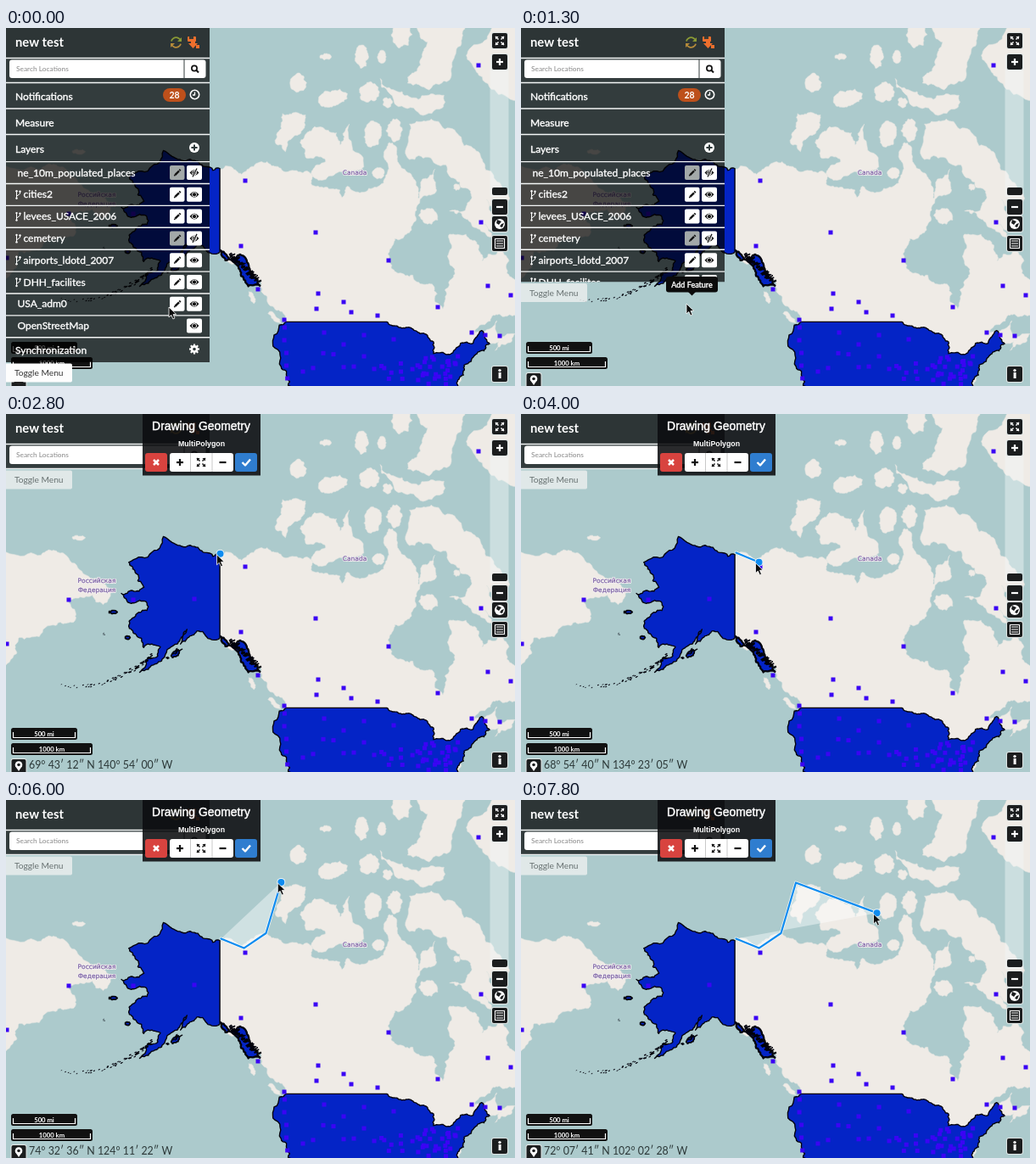
Recreate the animation shown at these times as an HTML page with a canvas. Size 600x422 px, loop 8 s.

```html
<!DOCTYPE html>
<html lang="en">
<head>
<meta charset="utf-8">
<title>Map drawing tool</title>
<style>
html, body { margin: 0; width: 100%; height: 100%; overflow: hidden; background: #accacc; }
canvas { display: block; }
</style>
</head>
<body>
<canvas id="stage" width="600" height="422"></canvas>
<script>
const W = 600, H = 422, LOOP = 8000, TAU = Math.PI * 2;
const BLUE = '#0424c6', DOT = '#3a04f4', DRAW = '#0f8cf0', LATO = 'Lato, sans-serif';
const ARIAL = '"Liberation Sans", Arial, sans-serif';
const stage = document.getElementById('stage').getContext('2d');
let g = stage;

// ---- Mercator projection; longitudes are degrees west ----
const mercator = lat => Math.log(Math.tan(Math.PI / 4 + lat * Math.PI / 360));
const project = (lon, lat) => [280.5 + (134.385 - lon) * 4.297, 174.6 - 246.2 * (mercator(lat) - 1.6816)];
const pairs = list => list.reduce((out, v, i) => (i % 2 ? out.push([list[i - 1], v]) : 0, out), []);

let seed = 7;
function random() {
  seed = (seed + 0x6D2B79F5) | 0;
  let v = Math.imul(seed ^ (seed >>> 15), 1 | seed);
  v = (v + Math.imul(v ^ (v >>> 7), 61 | v)) ^ v;
  return ((v ^ (v >>> 14)) >>> 0) / 4294967296;
}

// ---- Drawing helpers ----
function box(x, y, w, h, color, r = 0) {
  g.fillStyle = color;
  g.beginPath();
  g.roundRect(x, y, w, h, r);
  g.fill();
}
function disc(x, y, r, color) {
  g.fillStyle = color;
  g.beginPath();
  g.arc(x, y, r, 0, TAU);
  g.fill();
}
function ring(x, y, r, color, width = 1.4, from = 0, to = TAU) {
  g.strokeStyle = color;
  g.lineWidth = width;
  g.beginPath();
  g.arc(x, y, r, from, to);
  g.stroke();
}
function trace(points) {
  g.beginPath();
  points.forEach(([x, y], i) => i ? g.lineTo(x, y) : g.moveTo(x, y));
}
function line(color, width, ...coords) {
  trace(pairs(coords));
  g.strokeStyle = color;
  g.lineWidth = width;
  g.stroke();
}
function shape(points, fill, stroke, width = 1) {
  trace(points);
  g.closePath();
  if (fill) { g.fillStyle = fill; g.fill(); }
  if (stroke) { g.strokeStyle = stroke; g.lineWidth = width; g.stroke(); }
}
function text(str, x, y, font, color, align = 'left', weight = 0) {
  g.font = font;
  g.textAlign = align;
  g.textBaseline = 'alphabetic';
  g.fillStyle = g.strokeStyle = color;
  g.lineWidth = weight;
  if (weight) g.strokeText(str, x, y);
  g.fillText(str, x, y);
}

// ---- Coastlines: few points, roughened by midpoint displacement ----
function split(a, b, depth) {
  const dx = b[0] - a[0], dy = b[1] - a[1], len = Math.hypot(dx, dy);
  if (!depth || len > 75 || len < 2.5) return [a];
  const k = (random() - 0.5) * 0.42;
  const m = [(a[0] + b[0]) / 2 - dy * k, (a[1] + b[1]) / 2 + dx * k];
  return [...split(a, m, depth - 1), ...split(m, b, depth - 1)];
}
const roughen = pts => pts.flatMap((p, i) => split(p, pts[(i + 1) % pts.length], 4));
const coast = list => roughen(pairs(list).map(p => project(...p)));

function island(lon, lat, rx, ry, tilt = 0) {
  const [x, y] = project(lon, lat), c = Math.cos(tilt), s = Math.sin(tilt);
  return roughen(Array.from({ length: 7 }, (_, i) => {
    const u = rx * Math.cos(i * TAU / 7), v = ry * Math.sin(i * TAU / 7);
    return [x + u * c - v * s, y + u * s + v * c];
  }));
}

const MAINLAND = [141,69.6, 135,69.1, 128,70.3, 124,69.5, 115,69, 116,68.2, 108,67.5, 107.5,66.7, 106,67.9, 98,67.8,
  95.5,69, 96,71, 94.5,72, 92,70.2, 88,68.8, 86.5,66.6, 85.5,68.6, 82,69.6, 81.5,67.5, 87,65.3, 88,63.7, 93,61.8,
  94.7,58.9, 92,57, 85,55.3, 82.3,55, 82,52.5, 79.8,51.3, 79.2,54.5, 76.5,57, 78.2,59, 78,62.4, 73.5,62.4, 70,61,
  69,58.8, 65,59.8, 64.6,60.4, 61.5,56.5, 57,53.5, 58,51.4, 60,50.2, 66,50.2, 71,47, 65,49.2, 65,47, 64,46,
  60,46.8, 61.2,45.2, 65.5,43.6, 64.5,45.3, 67,44.9, 75,40.5, 77,35, 121,35, 124.2,42, 124.4,48.2, 122.7,49,
  128,52.5, 130,56, 136,58.5, 141,60];
const CHUKOTKA = [205,70, 190,69.6, 184,69.8, 175,67.3, 169.8,66.1, 173,64.3, 176,65.4, 182.5,64.6, 180.5,62.6,
  186,61.7, 196,60.1, 196.8,57.8, 205,53];
const VICTORIA = [105,69.2, 113,68.5, 116,69.2, 112,70.3, 117.5,70.7, 119,72, 115,73.3, 109,72.8, 108,71.8, 105.5,73.5,
  101.5,69.8];
const BANKS = [123,71.2, 125.8,72, 123.8,74.3, 117.5,74.2, 119,72.7];
const BAFFIN = [89,73.5, 81,73.7, 74,71.7, 68,69.5, 61.5,66.6, 64,65.2, 67.8,66.5, 65,64.2, 64.8,62.6, 68.5,63.7,
  66,61.9, 73,64.2, 78,65.2, 74,65.2, 72.5,67.5, 79,70, 89,70.5];
const DEVON = [92,74.8, 80,74.7, 79.5,75.6, 89,75.5, 97,76.7];
const ELLESMERE = [89.5,76.4, 78,76.6, 75,78.6, 73,80, 88,80, 84,78.8, 86,77.5];
const GREENLAND = [55,81, 65,80, 73,78.3, 69,76.8, 58,75.5, 57,74, 50,73];
const ALASKA = [141,69.65, 148,70.4, 156.5,71.3, 166,68.9, 163.5,67, 161.8,66.3, 168,65.6, 166.3,64.6, 161,64.5,
  161,63.6, 164.8,62.7, 166,61.6, 162.5,60, 161.9,58.7, 157.3,58.8, 158,57.5, 163,55, 158.5,56.3, 154,58.9,
  150,61.2, 151.8,59.2, 147,61, 145,60.4, 141,60];
const PANHANDLE = [141,60.3, 136.5,58.3, 133.2,55, 130,55.1, 132,56.8, 135.5,59.7, 137.5,59];
const STATES = [124.7,48.4, 122.8,49, 95.2,49, 89.5,48, 84.8,46.8, 82.4,45.3, 82.4,43, 79,42.8, 76.8,43.6, 75,45, 71.5,45,
  69.2,47.4, 67.8,45.7, 67,44.9, 70.8,42.8, 74,40.6, 76,36.9, 75.5,35, 121,35, 124.2,40.3];

// Longitude, latitude, half width, half height, tilt
const ISLANDS = [[97.5,69.2,7,7], [99,72.7,10,16], [93,73,9,14], [110,75.4,18,10,-0.3], [119.5,76.4,10,11],
  [100,75.8,12,12], [95,75.1,6,6], [102,78,8,14], [96.5,78,5,8], [112,78,7,4], [91,79.2,12,16],
  [83.8,64.6,12,9,0.4], [126,49.8,10,3,0.7], [132.2,53.2,3,8,-0.4], [76,67.8,4,4], [179.7,71.2,8,3]];
const BLUE_ISLANDS = [[153.2,57.8,6,3,-0.7], [170.3,63.4,5,2], [166.3,60.1,3,2]];
const CITIES = [557,44, 282,180, 365,241, 451,274, 560,229, 277,257, 297,308, 368,313, 366,331, 398,323, 407,335,
  438,339, 509,329, 568,304, 595,315, 74,219, 1,271, 222,218, 150,219, 328,344, 375,359, 398,373, 422,362, 457,367,
  549,359, 565,362, 582,363];

function speckles(count, at) {
  for (let i = 0; i < count; i++) {
    const [x, y, r] = at(random());
    g.save();
    g.translate(x + (random() - 0.5) * r * 3, y + (random() - 0.5) * r * 3);
    g.rotate(-0.5);
    box(-r, -r / 2, r * 2, r * (0.6 + random() * 0.5), '#02020c', 0.6);
    g.restore();
  }
}

function paintMap() {
  const land = pts => shape(pts, '#efebe6', '#e0e3df', 0.6);
  const ink = '#05050f', city = (x, y) => box(x - 2.5, y - 2.5, 5, 5, DOT);
  box(0, 0, W, H, '#accacc');
  [MAINLAND, CHUKOTKA, VICTORIA, BANKS, BAFFIN, DEVON, ELLESMERE, GREENLAND].forEach(c => land(coast(c)));
  ISLANDS.forEach(i => land(island(...i)));
  shape(coast(STATES), BLUE, ink, 1.4);
  shape(coast(PANHANDLE), BLUE, ink, 2.4);
  shape(coast(ALASKA), BLUE, ink, 1.4);
  BLUE_ISLANDS.forEach(i => shape(island(...i), BLUE, ink, 1.8));
  speckles(75, t => [264 + 33 * t, 266 + 32 * t, 2]);
  speckles(65, v => {
    const t = Math.sqrt(v), u = 1 - t;
    return [u * u * 55 + 2 * u * t * 117 + t * t * 176, u * u * 318 + 2 * u * t * 333 + t * t * 282, 0.8 + t * 0.8];
  });
  speckles(14, t => [190 + 16 * t, 289 - 13 * t, 1.5]);
  speckles(3, t => [114 + 3 * t, 258 + 2 * t, 0.8]);
  pairs(CITIES).forEach(p => city(...p));
  for (let i = 0; i < 5; i++) city(328 + random() * 5, 353 + i * 15);
  for (let i = 0; i < 8; i++) city(350 + i * 12, 380 + random() * 26);
  for (let i = 0; i < 40; i++) {
    const x = 440 + 100 * Math.sqrt(random()), y = 387 + random() * 34;
    if (x < 536 - (y - 385) * 0.4) city(x, y);
  }
  const label = (str, x, y) => {
    text(str, x, y, '7.5px "DejaVu Sans", sans-serif', '#f3eff0', 'center', 2);
    text(str, x, y, '7.5px "DejaVu Sans", sans-serif', '#7a60a4', 'center', 0.2);
  };
  label('Canada', 411, 173);
  label('Российская', 107, 199);
  label('Федерация', 107, 210);
}

// ---- Icons, centred on x, y ----
const minus = (x, y, c, r = 4, w = 2.2) => line(c, w, x - r, y, x + r, y);
const plus = (x, y, c, r = 4, w = 2.2) => { minus(x, y, c, r, w); line(c, w, x, y - r, x, y + r); };
function expand(x, y, c, r = 5) {
  for (const sx of [-1, 1]) for (const sy of [-1, 1]) {
    line(c, 1.5, x + sx * 1.5, y + sy * 1.5, x + sx * r, y + sy * r);
    shape([[x + sx * r, y + sy * r], [x + sx * (r - 3.6), y + sy * r], [x + sx * r, y + sy * (r - 3.6)]], c);
  }
}
function pencil(x, y) {
  line('#111', 2.4, x - 2.6, y + 2.6, x + 2, y - 2);
  line('#111', 2.4, x + 2.5, y - 2.5, x + 3.6, y - 3.6);
  disc(x - 3.2, y + 3.2, 0.9, '#111');
}
function eye(x, y, hidden) {
  g.fillStyle = '#111';
  g.beginPath();
  g.moveTo(x - 5.5, y);
  g.quadraticCurveTo(x, y - 7, x + 5.5, y);
  g.quadraticCurveTo(x, y + 7, x - 5.5, y);
  g.fill();
  ring(x, y, 2.6, '#fff', 0.9);
  if (hidden) {
    line('#fff', 2.6, x - 2, y + 5, x + 3, y - 5);
    line('#111', 1.3, x - 2, y + 5, x + 3, y - 5);
  }
}
function fork(x, y) {
  line('#fff', 1, x - 2, y - 4, x - 2, y + 5);
  line('#fff', 1, x - 2, y + 2, x + 2, y - 1, x + 2, y - 3);
  disc(x - 2, y - 4, 1.2, '#fff');
  disc(x + 2, y - 3.5, 1.2, '#fff');
  disc(x - 2, y + 4.5, 1.2, '#fff');
}
function gear(x, y) {
  for (let i = 0; i < 4; i++) {
    const a = i * Math.PI / 4, c = Math.cos(a) * 6, s = Math.sin(a) * 6;
    line('#fff', 2.2, x - c, y - s, x + c, y + s);
  }
  disc(x, y, 4.4, '#fff');
  disc(x, y, 1.8, '#313b3c');
}

// ---- Map controls ----
function paintControls() {
  box(570.5, 31, 22, 168, 'rgba(240,246,246,.45)', 2);
  const tile = (y, h = 18) => {
    box(572, y - 1, 20, h + 2, '#dfe5e4', 3);
    box(573, y, 18, h, '#1b1d1e', 2);
  };
  [6, 31, 202, 222, 245, 399].forEach(y => tile(y));
  box(573, 188, 18, 9, '#1b1d1e', 2);
  expand(582, 15, '#fff');
  plus(582, 40, '#fff');
  minus(582, 211, '#fff');
  disc(582, 231, 6, '#fff');
  shape([[579, 226], [584, 228], [581, 232], [578, 230]], '#1b1d1e');
  shape([[584, 231], [587, 230], [585, 235], [582, 234]], '#1b1d1e');
  g.strokeStyle = '#fff'; g.lineWidth = 1.1; g.strokeRect(576.5, 248.5, 11, 11);
  for (let y = 251; y < 258; y += 3) line('#fff', 1, 578, y, 586, y);
  box(580.6, 406, 3, 7, '#fff');
  disc(582, 403.6, 1.7, '#fff');

  const scale = (y, w, str) => {
    box(6, y, w, 14, '#111', 2.5);
    line('#fff', 1.2, 8.5, y + 5, 8.5, y + 11.5, w + 3.5, y + 11.5, w + 3.5, y + 5);
    text(str, 6 + w / 2, y + 9.6, 'bold 7.7px ' + LATO, '#fff', 'center');
  };
  scale(370, 78, '500 mi');
  scale(388, 96, '1000 km');
  box(5.5, 406, 19, 20, '#e5e9e8', 3);
  box(6.5, 407, 17, 19, '#1b1d1e', 2);
  disc(15, 413.5, 4.3, '#fff');
  shape([[11, 415], [19, 415], [15, 421]], '#fff');
  disc(15, 413.5, 1.8, '#1b1d1e');
}

// ---- Side menu ----
const LAYERS = ['ne_10m_populated_places', 'cities2', 'levees_USACE_2006', 'cemetery',
  'airports_ldotd_2007', 'DHH_facilites', 'USA_adm0', 'OpenStreetMap'];

function paintMenu(height, hover) {
  g.save();
  g.beginPath(); g.rect(0, 0, 240, height); g.clip();
  box(0, 0, 240, height, 'rgba(0,0,0,.7)');
  box(0, 0, 240, 35, 'rgba(0,0,0,.12)');
  const rule = y => line('#f4f6f6', 1.4, 0, y, 240, y);
  [35.5, 64.5, 95, 125.5].forEach(rule);
  for (let i = 0; i < 9; i++) rule(157.6 + i * 25.9);
  text('new test', 11, 22, 'bold 14.8px ' + LATO, '#fff');
  ring(200.5, 17, 5.8, '#8a9a35', 1.8, 3.4, 6);
  ring(200.5, 17, 5.8, '#b58a3a', 1.8, 0.3, 2.8);
  shape([[207, 11], [207, 16], [202, 16]], '#8a9a35');
  shape([[194, 23], [194, 18], [199, 18]], '#b58a3a');
  box(214, 10, 10, 6, '#ee6f2d', 1);
  box(216, 10, 5, 3, '#3b3a34');
  box(218, 14, 5, 5, '#ee6f2d');
  shape([[215, 18], [226, 18], [220.5, 24]], '#ee6f2d');
  box(224, 20, 4, 4, '#ee6f2d');

  box(4, 37.5, 205.5, 21.5, '#fff', [3, 0, 0, 3]);
  box(210.5, 37.5, 25, 21.5, '#fff', [0, 3, 3, 0]);
  text('Search Locations', 12, 51, '8.4px ' + LATO, '#888');
  ring(222, 47.5, 3.1, '#111', 1.7);
  line('#111', 2, 224.3, 49.8, 227, 52.5);

  const heading = (str, y) => text(str, 11, y, '12px ' + LATO, '#fff', 'left', 0.4);
  heading('Notifications', 85);
  heading('Measure', 116);
  heading('Layers', 147);
  heading('Synchronization', 384);
  box(185, 71, 27, 16, '#bd501b', 8);
  text('28', 198.5, 82.5, 'bold 10.5px ' + LATO, '#fff', 'center');
  ring(222.5, 78.5, 5.2, '#fff', 1.6);
  line('#fff', 1.3, 222.5, 75.5, 222.5, 79, 220, 79);
  disc(222, 141, 6, '#fff');
  plus(222, 141, '#303b3c', 3.6, 2);
  gear(222, 378.5);

  LAYERS.forEach((name, i) => {
    const y = 170.5 + i * 25.8, off = i === 0 || i === 3, branch = i > 0 && i < 6;
    if (branch) fork(14.5, y);
    text(name, branch ? 20.5 : 13.5, y + 4, '12px ' + LATO, '#fff', 'left', 0.35);
    if (i < 7) {
      box(193, y - 8.5, 17.5, 17, off ? '#a3a9a9' : hover && i === 6 ? '#dfe2e2' : '#fff', 2);
      pencil(202, y);
    }
    box(213, y - 8.5, 18, 17, '#fff', 2);
    eye(222, y, off);
  });
  g.restore();

  const open = height > 390;
  box(0, height + 1.5, 78, 22, open ? '#fdfdfd' : 'rgba(232,237,237,.87)', [0, 2, 2, 0]);
  if (open) shape([[9, 417], [21, 417], [15, 422]], '#222');
  text('Toggle Menu', 10, height + 16, '10.2px ' + LATO, open ? '#333' : '#667070');
}

function paintTooltip(alpha) {
  g.globalAlpha = alpha;
  box(171, 293, 61, 18.5, '#0b0b0b', 3);
  shape([[197, 311], [206, 311], [201.5, 315.5]], '#0b0b0b');
  text('Add Feature', 201.5, 305.8, '9px ' + LATO, '#fff', 'center', 0.4);
  g.globalAlpha = 1;
}

function paintToolbox(height) {
  box(161, 0, 139, height, 'rgba(12,13,15,.88)');
  text('Drawing Geometry', 230, 19, '13.9px ' + ARIAL, '#fff', 'center', 0.45);
  text('MultiPolygon', 230.5, 38, 'bold 8.8px ' + ARIAL, '#fff', 'center');
  box(164, 46, 26, 22, '#d8433f', 3);
  box(193, 46, 75, 22, '#fff', 3);
  box(270, 46, 26, 22, '#2f7dcf', 3);
  line('#c9c9c9', 1, 217.5, 46, 217.5, 68);
  line('#c9c9c9', 1, 243, 46, 243, 68);
  line('#fff', 2.5, 174, 54, 180, 60);
  line('#fff', 2.5, 180, 54, 174, 60);
  plus(205, 57, '#111');
  expand(230, 57, '#111');
  minus(255.5, 57, '#111');
  line('#fff', 2.4, 278.5, 57, 282, 60.5, 288, 53.5);
}

function paintCursor(x, y) {
  const outline = [[0, 0], [0, 12], [2.8, 9.4], [4.9, 14], [7, 13], [5, 8.6], [8.6, 8.3]];
  shape(outline.map(([dx, dy]) => [x + dx, y + dy]), '#0a0a0a', '#fff', 0.8);
}

// ---- Timeline ----
// Menu phase: time, cursor x, cursor y, menu height, tooltip opacity
const MENU_STEPS = [[0, 192, 329, 394, 0], [300, 196, 327, 394, 0.6], [500, 197, 325, 394, 1],
  [1000, 195, 325, 394, 1], [1300, 195, 325, 299.5, 1], [1500, 197, 319, 65, 0.9]];
// Drawing phase: time, longitude west, latitude, corners already placed
const DRAW_STEPS = [[1800, 150.5567, 57.7042, 0], [2000, 150.2, 58.2, 0], [2300, 145.2, 64.9, 0],
  [2500, 140.9, 69.72, 0], [3000, 140.85, 69.67, 1], [3300, 137.2, 69.25, 1], [3500, 134.6, 68.93, 1],
  [4000, 134.3847, 68.9111, 1], [4300, 134.3847, 68.9111, 2], [4500, 133.1, 69.15, 2], [4800, 129.8, 69.9, 2],
  [5000, 128.3, 70.4, 2], [5300, 125.5958, 73.0225, 3], [5500, 124.1894, 74.5433, 3], [6300, 124.1894, 74.5433, 4],
  [6500, 123.6, 74.5, 4], [6800, 113.5, 73.5, 4], [7000, 103.8, 72.123, 4], [7300, 103, 72.126, 4],
  [7500, 102.7, 72.129, 4], [7800, 102.0411, 72.1281, 4]];
const CORNERS = [[253.5, 163.5], [280.5, 174.6], [306.5, 157], [324, 97.5]];

const stepAt = (steps, t) => steps.filter(s => s[0] <= t).pop();
function degrees(value) {
  const s = Math.round(value * 3600), two = n => String(n).padStart(2, '0');
  return `${Math.floor(s / 3600)}° ${two(Math.floor(s / 60) % 60)}′ ${two(s % 60)}″`;
}

function paintDrawing(t) {
  const [, lon, lat, placed] = stepAt(DRAW_STEPS, t);
  const [x, y] = project(lon, lat);
  const path = [...CORNERS.slice(0, placed), [x, y]];
  if (placed > 1) shape(path, 'rgba(255,255,255,.42)');
  g.lineJoin = g.lineCap = 'round';
  trace(path);
  g.strokeStyle = 'rgba(255,255,255,.75)'; g.lineWidth = 3.8; g.stroke();
  g.strokeStyle = DRAW; g.lineWidth = 2.2; g.stroke();
  g.lineCap = 'butt';
  disc(x, y, 5, '#e9f3f8');
  disc(x, y, 4, DRAW);
  text(`${degrees(lat)} N ${degrees(lon)} W`, 27, 418, '12.4px ' + LATO, '#2c3838');
  paintMenu(65, false);
  if (t < 2000) paintTooltip(0.48);
  paintToolbox(t < 2000 ? 68.5 : 72.5);
  paintCursor(x - 4, y + 1);
}

function paintOpening(t) {
  const [, x, y, height, tip] = stepAt(MENU_STEPS, t);
  paintMenu(height, t >= 500);
  if (tip) paintTooltip(tip);
  paintCursor(x, y);
}

const backdrop = document.createElement('canvas');
backdrop.width = W;
backdrop.height = H;
g = backdrop.getContext('2d');
g.lineJoin = stage.lineJoin = 'round';
paintMap();
paintControls();
g = stage;

const start = performance.now();
function frame(now) {
  const t = Math.max(0, now - start) % LOOP;
  g.drawImage(backdrop, 0, 0);
  if (t < 1800) paintOpening(t);
  else paintDrawing(t);
  requestAnimationFrame(frame);
}
requestAnimationFrame(frame);
</script>
</body>
</html>
```
